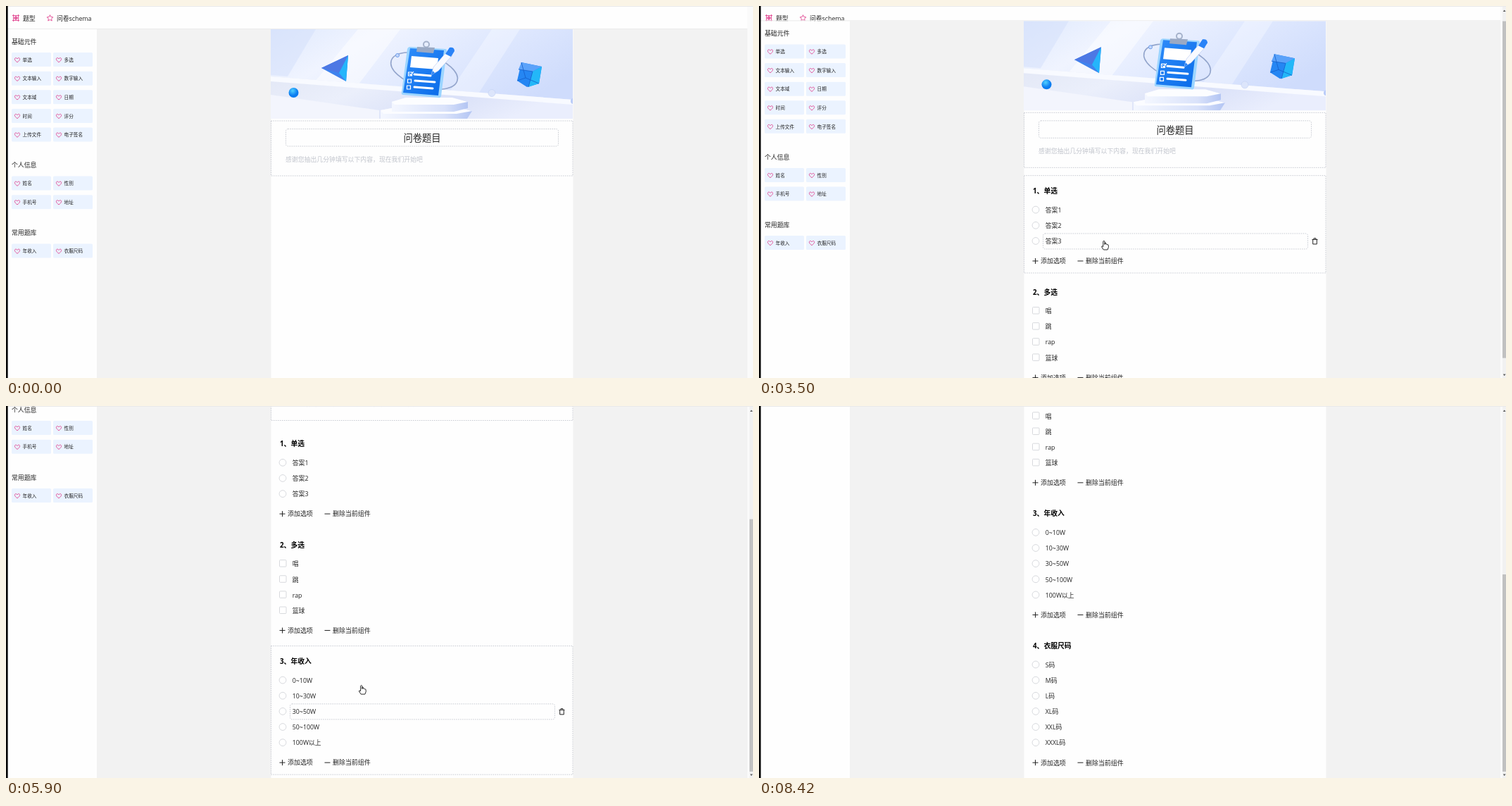
An HTML page for the animation above (9.69 s loop, 1061 by 528 pixels).

```html
<!DOCTYPE html>
<html>
<head>
<meta charset="utf-8">
<style>
html, body { margin: 0; width: 100%; height: 100%; overflow: hidden; background: #fefefe; }
svg { display: block; }
text { font-family: "Open Sans", "Noto Sans CJK SC", "Noto Sans CJK", sans-serif; fill: #222; white-space: pre; }
.dash { fill: none; stroke: #c3c7ce; stroke-dasharray: 1.6 1.4; stroke-width: .9; }
.box { fill: #fff; stroke: #d3d5da; stroke-width: .9; }
.pink { fill: none; stroke: #e0438f; stroke-width: .9; }
.ink { fill: none; stroke: #222; stroke-width: 1; }
.cur { fill: #fff; stroke: #111; stroke-width: .9; stroke-linejoin: round; }
</style>
</head>
<body>
<svg id="stage" width="1061" height="528" viewBox="0 0 1061 528">
  <defs>
    <linearGradient id="sky" x2="1" y2=".5">
      <stop offset="0" stop-color="#dfe9fd"/><stop offset=".3" stop-color="#f0f4ff"/>
      <stop offset=".65" stop-color="#dfe8fe"/><stop offset="1" stop-color="#cfdcfc"/>
    </linearGradient>
    <linearGradient id="floor" x2="1" y2=".3">
      <stop offset="0" stop-color="#e3e8f6"/><stop offset=".35" stop-color="#ebeffb"/>
      <stop offset=".7" stop-color="#dae1f8"/><stop offset="1" stop-color="#eaeefd"/>
    </linearGradient>
    <linearGradient id="blue" x2="1" y2="1">
      <stop offset="0" stop-color="#2f8dfa"/><stop offset="1" stop-color="#0a6be8"/>
    </linearGradient>
    <linearGradient id="step" x2="1">
      <stop offset="0" stop-color="#f4f7ff"/><stop offset=".7" stop-color="#d9e2fa"/><stop offset="1" stop-color="#b3c5f3"/>
    </linearGradient>
    <radialGradient id="ball" cx=".4" cy=".3">
      <stop offset="0" stop-color="#4fd0ff"/><stop offset="1" stop-color="#0b7cf0"/>
    </radialGradient>
    <clipPath id="frame"><rect x="376" y="33" width="429" height="127"/></clipPath>
  </defs>
  <g id="header"></g>
  <g id="page">
    <rect x="3" y="33" width="126" height="1500" fill="#fefefe"/>
    <rect x="129" y="33" width="924" height="1500" fill="#f2f2f2"/>
    <rect x="376.500" y="33" width="429" height="1500" fill="#fefefe"/>
    <rect y="32" width="1061" height="1" fill="#ececec"/>
    <g id="banner" clip-path="url(#frame)">
      <rect x="376" y="33" width="429" height="127" fill="url(#sky)"/>
      <path d="M376 33H440L400 100L376 98Z" fill="#d3e0fb" opacity=".5"/>
      <path d="M500 33H560L500 112L440 106Z" fill="#fff" opacity=".5"/>
      <path d="M690 33H730L670 126L630 122Z" fill="#fff" opacity=".3"/>
      <path d="M376 100L805 133V160H376Z" fill="url(#floor)"/>
      <path d="M376 100L805 133V140L376 107Z" fill="#f8faff"/>
      <path d="M376 126L530 148V160H376Z" fill="#f3f5fd"/>
      <path d="M448 88L486 70L483 107Z" fill="#3f83ee"/>
      <path d="M448 88L486 70L473 95Z" fill="#4d78e4"/>
      <path d="M473 95L486 70L483 107Z" fill="#25b5fb"/>
      <circle cx="408.500" cy="123" r="7" fill="url(#ball)"/>
      <circle cx="690" cy="123.500" r="5" fill="#dce5fb" stroke="#c2d0f4" stroke-width=".6"/>
      <circle cx="806" cy="135" r="4" fill="#b9cbf8"/>
      <path d="M532 148L558 143H638L662 149L655 160H532Z" fill="url(#step)"/>
      <path d="M532 148L558 143H638L662 149L640 153H536Z" fill="#fbfcff"/>
      <path d="M548 136L568 130H634L656 136V145L636 150H548Z" fill="url(#step)"/>
      <path d="M548 136L568 130H634L656 136L636 140H552Z" fill="#fcfdff"/>
      <ellipse cx="594" cy="92" rx="49" ry="23" transform="rotate(17 594 92)" fill="none" stroke="#93a5cc" stroke-width="1.600"/>
      <path d="M574 58L624 61Q626 61 626 64L618 128Q617 131 614 130L564 126Q561 126 562 122L570 61Q571 58 574 58Z" fill="#9cd5ff"/>
      <path d="M574 60L622 63L614 127L564 123Z" fill="url(#blue)"/>
      <path d="M576 71L614 74L612 90L574 87Z" fill="#fff"/>
      <path d="M580 97L603 99M581 106L609 108M580 115L606 117" stroke="#fff" stroke-width="3" stroke-linecap="round"/>
      <path d="M571.500 94h5v5h-5zM570.500 104h5v5h-5zM569.500 113h5v5h-5zM573 96l2 2l4-5" fill="none" stroke="#fff" stroke-width="1.200"/>
      <circle cx="597" cy="54.500" r="4" fill="none" stroke="#a6b3cb" stroke-width="2"/>
      <path d="M584 58L609 59L607 67L583 65Z" fill="#9aa9c4"/>
      <path d="M604 98L607 87L626 65L634 70L614 92Z" fill="#f8faff" stroke="#b6c6ee" stroke-width=".6"/>
      <path d="M624 68L630 59Q637 58 637 64L632 72Z" fill="#2a83f7"/>
      <path d="M604 98L606 92L609 95Z" fill="#2a83f7"/>
      <circle cx="556" cy="70" r="2.500" fill="#c5d8fb" stroke="#6f9eea"/>
      <path d="M732 80L761 86L757 110L740 115L726 106Z" fill="#2586f3"/>
      <path d="M732 80L761 86L748 93L728 90Z" fill="#5aa2fa"/>
      <path d="M748 93L761 86L757 110L742 115Z" fill="#23b7f8"/>
      <path d="M728 90L748 93L742 115M732 80L738 102L757 110M738 102L726 106" fill="none" stroke="#155fc9" stroke-width=".8"/>
    </g>
    <rect class="dash" x="376.500" y="163" width="428.500" height="78"/>
    <rect class="dash" x="397.500" y="174.500" width="387" height="24.500" rx="3"/>
    <g id="content"></g>
    <rect id="outline" class="dash" x="376.500" width="428.500"/>
    <g id="rowHover">
      <rect class="dash" x="403.500" y="-11" width="376" height="22" rx="3"/>
      <path class="ink" d="M785.500-2.500h8M788-3v-1.200h3v1.200M786.700-2v6h5.600v-6"/>
    </g>
  </g>
  <rect x="1053" width="8" height="528" fill="#fafafa"/>
  <g id="bar">
    <rect x="1056" y="1" width="5" height="527" fill="#f1f1f1"/>
    <path d="M1056.800 8l1.900-2.500l1.900 2.500zM1056.800 522.500l1.900 2.500l1.900-2.500z" fill="#555"/>
    <rect id="thumb" x="1056" width="5" fill="#c1c1c1"/>
  </g>
  <rect width="1061" height="1" fill="#e9e9e9"/>
  <rect width="2.600" height="528" fill="#000"/>
  <g id="ghost" opacity=".7"></g>
  <g id="cursor">
    <circle id="glow" r="6.500" fill="#fbf43a" opacity=".85"/>
    <g id="no" fill="none" stroke="#111" stroke-width="1.300"><circle r="4.600"/><path d="M-3.200-3.200l6.400 6.400"/></g>
    <path id="arrow" class="cur" d="M0 0v9.500l2.200-2l1.500 3.500l1.600-.7l-1.500-3.300h3z"/>
    <path id="plus" class="cur" d="M2 7h5v4h-5zM4.500 9h6v6h-6zM6 12h3M7.500 10.500v3"/>
    <path id="hand" class="cur" d="M-1 1.200Q0-.6 1.200 1.200V5.500Q2-.0 3.200 5.200Q4.200 4.300 5 5.800Q6.600 5.300 6.600 7.500V9.500L5.200 13H-.4L-3.200 8.800Q-3.300 7-1 8.500Z"/>
  </g>
</svg>
<script>
const $ = id => document.getElementById(id);
const text = (s, x, y, size, extra = '') =>
  `<text x="${x}" y="${y + size * .37}" font-size="${size}" ${extra}>${s}</text>`;

// Sidebar
const heart = (x, y) =>
  `<path class="pink" d="M${x} ${y + 3.2}C${x - 7} ${y - 1.5} ${x - 2} ${y - 5} ${x} ${y - 1.6}C${x + 2} ${y - 5} ${x + 7} ${y - 1.5} ${x} ${y + 3.2}Z"/>`;
const tile = (label, x, y) =>
  `<rect x="${x}" y="${y}" width="56" height="20" rx="1.5" fill="#ebf3ff"/>` +
  heart(x + 8, y + 10.5) + text(label, x + 15.5, y + 10.3, 6.65);
const groups = [
  ['基础元件', 50.5, '单选 多选 文本输入 数字输入 文本域 日期 时间 评分 上传文件 电子签名'],
  ['个人信息', 226, '姓名 性别 手机号 地址'],
  ['常用题库', 322, '年收入 衣服尺码'],
];
let html = text('问卷题目', 591, 187.3, 13.3, 'text-anchor="middle"') +
  text('感谢您抽出几分钟填写以下内容，现在我们开始吧', 397, 217.5, 8.87, 'style="fill:#c0c4cc"');
for (const [name, y, labels] of groups) {
  html += text(name, 8, y, 8.9);
  labels.split(' ').forEach((s, i) => {
    html += `<g id="${s}">${tile(s, i % 2 ? 67 : 8, y + 15.6 + (i >> 1) * 26.6)}</g>`;
  });
}

// Questions: title, options, time of appearance
const ROW = 22.15;
const questions = [
  ['单选', '答案1 答案2 答案3', 1200],
  ['多选', '唱 跳 rap 篮球', 3030],
  ['年收入', '0~10W 10~30W 30~50W 50~100W 100W以上', 5060],
  ['衣服尺码', 'S码 M码 L码 XL码 XXL码 XXXL码', 7230],
];
let nextY = 252.3;
const blocks = questions.map(([name, list, at], n) => {
  const rows = list.split(' '), y = nextY;
  const h = 94 + (rows.length - 1) * ROW;
  const act = y + h - 17;
  html += `<g id="q${n}">` + text(`${n + 1}、${name}`, 389, y + 22, 9.8, 'font-weight="700" style="fill:#000"');
  rows.forEach((s, i) => {
    const ry = y + 49 + i * ROW;
    html += name === '多选'
      ? `<rect class="box" x="388.5" y="${ry - 5.5}" width="9.5" height="9.5" rx="1"/>`
      : `<circle class="box" cx="393" cy="${ry - .5}" r="4.9"/>`;
    html += text(s, 406.8, ry, 8.8);
  });
  html += `<path class="ink" d="M388.500 ${act}h8M392.500 ${act - 4}v8M452.500 ${act}h8"/>` +
    text('添加选项', 400, act, 8.95) + text('删除当前组件', 464, act, 8.95) + '</g>';
  nextY += h + 5;
  return { y, h, at, rows: rows.length };
});
$('content').innerHTML = html;

let star = '';
for (let i = 0; i < 10; i++) {
  const r = i % 2 ? 2.2 : 4.6, a = (i / 5 - .5) * Math.PI;
  star += `${62.5 + r * Math.cos(a)},${17.3 + r * Math.sin(a)} `;
}
$('header').innerHTML = text('题型', 24, 17.3, 8.9) + text('问卷schema', 72, 17.3, 8.8) +
  `<polygon class="pink" points="${star}"/>
  <path class="pink" d="M10.500 13.500h7v7h-7zM12.500 15.500h3v3h-3zM9 13.500h1.500v-1.500M17.500 12v1.500h1.500M9 20.500h1.500v1.500M17.500 22v-1.500h1.500M14 13.500v7M10.500 17h7"/>`;

// Motion: [time, x, y] for the pointer, [time, y] for scrolling
const pointer = [
  [70, 1056, 528], [560, 40, 78], [700, 40, 78], [1000, 480, 300], [1180, 520, 330], [1400, 540, 340],
  [1900, 95, 76], [2050, 95, 76], [2400, 240, 190], [2610, 385, 320], [2680, 523, 418], [2820, 556, 454],
  [3030, 556, 454], [3200, 540, 400], [3430, 495, 334], [3500, 490, 333], [3600, 470, 330], [3900, 120, 300],
  [4060, 60, 290], [4200, 40, 318], [4270, 40, 318], [4600, 480, 470], [4660, 515, 489], [4730, 515, 489],
  [4900, 518, 495], [5100, 518, 495], [5500, 560, 460], [5830, 520, 434], [5900, 508, 398], [6000, 170, 205],
  [6380, 95, 127], [6580, 100, 128], [6930, 519, 425], [7000, 525, 435], [7150, 530, 440], [7600, 560, 400],
  [8350, 800, 545],
];
const scrolling = [
  [3300, 0], [3500, 11.5], [3640, 32.8], [5300, 32.8], [5700, 220.5], [7350, 220.5], [7950, 430.2],
];
// Tile, press, release, grab offset inside the tile
const drags = [
  ['单选', 650, 1190, 32, 12], ['多选', 2050, 3000, 28, 10],
  ['年收入', 4240, 5040, 32, 14], ['衣服尺码', 6560, 7180, 33, 11],
];
const LAG = 70, LOOP = 9690;

function track(keys, t) {
  const i = keys.findIndex(k => k[0] > t);
  if (i < 0) return keys[keys.length - 1].slice(1);
  if (!i) return keys[0].slice(1);
  const a = keys[i - 1], b = keys[i], f = (t - a[0]) / (b[0] - a[0]);
  return a.slice(1).map((v, j) => v + (b[j + 1] - v) * f);
}
const show = (id, on) => $(id).style.display = on ? '' : 'none';
const move = (id, x, y) => $(id).setAttribute('transform', `translate(${x} ${y})`);
const attrs = (id, map) => Object.entries(map).forEach(([k, v]) => $(id).setAttribute(k, v));

function draw(t) {
  const [scroll] = track(scrolling, t), [x, y] = track(pointer, t), [lx, ly] = track(pointer, t - LAG);
  move('page', 0, -scroll);
  show('header', scroll < 16);
  blocks.forEach((b, i) => show('q' + i, t >= b.at));

  const last = blocks.filter(b => t >= b.at).pop();
  const height = last ? last.y + last.h + 5 : 0;
  show('bar', height > 528);
  if (height > 528) attrs('thumb', { y: 11 + 508 * scroll / height, height: 508 * 528 / height });

  // Dragging
  const drag = drags.find(d => t >= d[1] && t < d[2]);
  const gx = drag ? lx - drag[3] : 0;
  const allowed = drag && gx > 376;
  for (const [name] of drags)
    $(name).firstChild.setAttribute('fill', allowed && drag[0] === name ? '#f6f7fb' : '#ebf3ff');
  show('ghost', drag);
  if (drag) {
    $('ghost').innerHTML = tile(drag[0], 0, 0);
    if (allowed) $('ghost').firstChild.setAttribute('fill', '#f3f4f9');
    move('ghost', gx, ly - drag[4]);
  }

  // Hover
  const docY = ly + scroll;
  const hit = !drag && t < 8300 && lx > 376 && lx < 805 &&
    blocks.find(b => t >= b.at && docY > b.y && docY < b.y + b.h);
  show('outline', hit);
  if (hit) attrs('outline', { y: hit.y, height: hit.h });
  const row = hit ? Math.round((docY - hit.y - 49) / ROW) : -1;
  const onRow = row >= 0 && row < hit.rows;
  show('rowHover', onRow);
  if (onRow) move('rowHover', 0, hit.y + 49 + row * ROW);

  // Pointer
  const hand = !drag && (hit || x < 129);
  show('cursor', t >= 70 && t < 8350);
  move('cursor', x, y);
  show('glow', drag);
  show('no', drag && !allowed);
  show('plus', allowed);
  show('hand', hand);
  show('arrow', allowed || !drag && !hand);
}

function tick() {
  draw(performance.now() % LOOP);
  requestAnimationFrame(tick);
}
tick();
</script>
</body>
</html>
```
